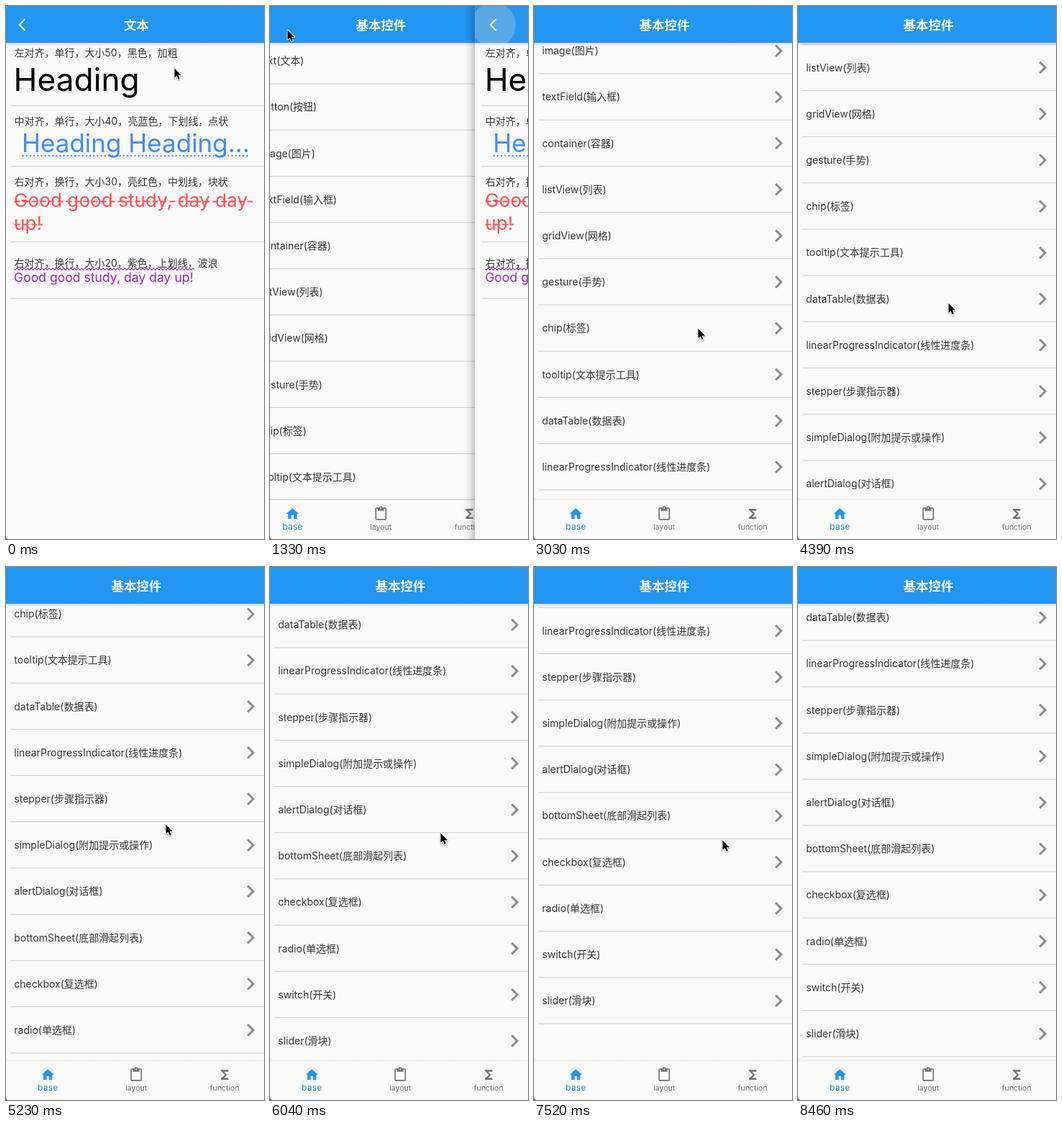
Write an HTML page with a canvas that moves like this. It is 359 by 740 pixels and loops after 8930 ms.

```html
<!DOCTYPE html>
<html lang="zh-CN">
<head>
<meta charset="utf-8">
<style>
html, body { margin: 0; width: 359px; height: 740px; overflow: hidden; background: #fafafa; }
canvas { display: block; }
</style>
</head>
<body>
<canvas id="stage" width="359" height="740"></canvas>
<script>
const ctx = document.getElementById('stage').getContext('2d');
const LOOP = 8930, LEFT = -3, WIDTH = 369, BAR = 51, NAV = 686, ROW = 64.2;
const MAX_SCROLL = 648, GLIDE = 50, LIFT = 130;
const FAMILY = 'Inter, "Noto Sans CJK SC", "Noto Sans CJK", sans-serif';
const INK = '#383838', BLUE = '#2196f3', PAPER = '#fafafa', GRAY = '#757575';

const rows = ['text(文本)', 'button(按钮)', 'image(图片)', 'textField(输入框)', 'container(容器)',
  'listView(列表)', 'gridView(网格)', 'gesture(手势)', 'chip(标签)', 'tooltip(文本提示工具)',
  'dataTable(数据表)', 'linearProgressIndicator(线性进度条)', 'stepper(步骤指示器)',
  'simpleDialog(附加提示或操作)', 'alertDialog(对话框)', 'bottomSheet(底部滑起列表)',
  'checkbox(复选框)', 'radio(单选框)', 'switch(开关)', 'slider(滑块)'];

const icons = {
  back: new Path2D('M11.67 3.87L9.9 2.1 0 12l9.9 9.9 1.77-1.77L3.54 12z'),
  next: new Path2D('M8.59 16.59L13.17 12 8.59 7.41 10 6l6 6-6 6z'),
  home: new Path2D('M10 20v-6h4v6h5v-8h3L12 3 2 12h3v8z'),
  clipboard: new Path2D('M19 2h-4.18C14.4.84 13.3 0 12 0c-1.3 0-2.4.84-2.82 2H5c-1.1 0-2 .9-2 2v16' +
    'c0 1.1.9 2 2 2h14c1.1 0 2-.9 2-2V4c0-1.1-.9-2-2-2zm-7 0c.55 0 1 .45 1 1s-.45 1-1 1-1-.45-1-1 ' +
    '.45-1 1-1zm7 18H5V4h2v3h10V4h2z'),
  sum: new Path2D('M18 4H6v2l6.5 6L6 18v2h12v-3h-7l5-5-5-5h7z'),
  cursor: new Path2D('M0 0V15.5L3.6 12.2 6 17.8 8.5 16.7 6.1 11.2H11z')
};

const easeOut = p => 1 - (1 - p) ** 3;
const smooth = p => p * p * (3 - 2 * p);
const clamp = p => Math.min(1, Math.max(0, p));
const progress = (t, from, to) => clamp((t - from) / (to - from));
const mix = (a, b, p) => a + (b - a) * p;

// Each swipe drags the list to `peak` in its first third, then glides on or springs back.
const swipes = [
  { start: 2020, end: 2910, peak: 92, x: 203, y: 380 },
  { start: 3030, end: 3910, peak: 261, x: 228, y: 448 },
  { start: 4390, end: 4850, peak: 405, x: 209, y: 413 },
  { start: 5060, end: 6040, peak: 588, x: 222, y: 425 },
  { start: 6340, end: 7140, peak: 694, x: 237, y: 369 },
  { start: 7260, end: 8040, peak: 694, x: 262, y: 509 }
];
const release = s => mix(s.start, s.end, 1 / 3);

function scrollAt(t) {
  return swipes.reduce((pos, s) => {
    const dragged = mix(pos, s.peak, progress(t, s.start, release(s)));
    const rest = Math.min(s.peak + GLIDE, MAX_SCROLL);
    return mix(dragged, rest, easeOut(progress(t, release(s), s.end)));
  }, 0);
}

// The pointer visits the back button, lifts with every swipe, then leaves at the bottom.
function cursorAt(t) {
  let x = 234, y = 86;
  const move = (from, to, toX, toY, ease = smooth) => {
    const p = ease(progress(t, from, to));
    x = mix(x, toX, p);
    y = mix(y, toY, p);
  };
  move(60, 580, 24, 33);
  move(1600, 1850, swipes[0].x, swipes[0].y);
  swipes.forEach((s, i) => {
    const next = swipes[i + 1] || { x: 294, y: 713 };
    move(s.start, release(s), s.x, s.y - LIFT, clamp);
    move(release(s), s.end, next.x, next.y);
  });
  move(8380, 8460, 312, 750);
  return [x, y];
}

// Page slide curve: cubic-bezier(.35, .91, .33, .97)
function slide(x) {
  const curve = (a, b, u) => 3 * (1 - u) ** 2 * u * a + 3 * (1 - u) * u * u * b + u ** 3;
  let lo = 0, hi = 1;
  for (let i = 0; i < 20; i++) {
    const mid = (lo + hi) / 2;
    if (curve(.35, .33, mid) < x) lo = mid; else hi = mid;
  }
  return curve(.91, .97, lo);
}

function text(str, x, y, size = 14, color = INK, align = 'left', weight = 400) {
  ctx.font = `${weight} ${size}px ${FAMILY}`;
  ctx.fillStyle = color;
  ctx.textAlign = align;
  ctx.fillText(str, x, y);
}

function icon(path, x, y, scale, color) {
  ctx.save();
  ctx.translate(x, y);
  ctx.scale(scale, scale);
  ctx.fillStyle = color;
  ctx.fill(path, 'evenodd');
  ctx.restore();
}

function rect(x, y, w, h, color) {
  ctx.fillStyle = color;
  ctx.fillRect(x, y, w, h);
}

function fade(x0, y0, x1, y1, stops) {
  const g = ctx.createLinearGradient(x0, y0, x1, y1);
  stops.forEach(([at, alpha]) => g.addColorStop(at, `rgba(0,0,0,${alpha})`));
  return g;
}

function divider(y) {
  rect(6, y, WIDTH - 9, 1, '#d0d0d0');
}

function dashes(x0, x1, y, color, width, pattern, cap = 'butt') {
  ctx.save();
  ctx.strokeStyle = color;
  ctx.lineWidth = width;
  ctx.lineCap = cap;
  ctx.setLineDash(pattern);
  ctx.beginPath();
  ctx.moveTo(x0, y);
  ctx.lineTo(x1, y);
  ctx.stroke();
  ctx.restore();
}

function wave(x0, x1, y, color) {
  ctx.strokeStyle = color;
  ctx.lineWidth = 1.1;
  ctx.beginPath();
  for (let x = x0; x <= x1; x += .5) ctx.lineTo(x, y + 1.2 * Math.sin((x - x0) * Math.PI / 2.5));
  ctx.stroke();
}

function appBar(title) {
  rect(LEFT, BAR, WIDTH, 5, fade(0, BAR, 0, BAR + 5, [[0, .2], [.4, .08], [1, 0]]));
  rect(LEFT, 0, WIDTH, BAR, BLUE);
  text(title, 181.5, 32.6, 17.5, '#fff', 'center', 600);
}

function listPage(scroll) {
  rect(LEFT, 0, WIDTH, 740, PAPER);
  rows.forEach((label, i) => {
    const y = 76.2 + i * ROW - scroll;
    text(label, 11.3, y + 5);
    icon(icons.next, 322.7, y - 17.5, 1.46, '#8a8a8a');
    divider(y + 31.3);
  });
  appBar('基本控件');
  rect(LEFT, NAV - 3, WIDTH, 3, fade(0, NAV - 3, 0, NAV, [[0, 0], [1, .07]]));
  rect(LEFT, NAV, WIDTH, 740 - NAV, PAPER);
  [['base', icons.home], ['layout', icons.clipboard], ['function', icons.sum]].forEach(([label, path], i) => {
    const x = 58.2 + i * WIDTH / 3, size = i ? 10.5 : 12.3, color = i ? GRAY : BLUE;
    icon(path, x - 10.5, 694.5, .877, color);
    text(label, x, 726.8, size, color, 'center');
  });
}

function textPage(press) {
  const blue = '#448aff', red = '#ff5252', purple = '#9c27b0';
  rect(LEFT, 0, WIDTH, 740, PAPER);
  text('左对齐，单行，大小50，黑色，加粗', 11.5, 70);
  text('Heading', 10.5, 117.5, 44.3, '#000');
  text('中对齐，单行，大小40，亮蓝色，下划线，点状', 11.5, 164.5);
  text('Heading Heading…', 22, 202.7, 35, blue);
  dashes(23.5, 338, 208, blue, 2.3, [0, 5.2], 'round');
  text('右对齐，换行，大小30，亮红色，中划线，块状', 11.5, 248.5);
  text('Good good study, day day', 11, 279, 26.2, red);
  dashes(11.5, 348, 271.5, red, 1.8, [8, 4]);
  text('up!', 11, 311, 26.2, red);
  dashes(11.5, 51, 303.5, red, 1.8, [8, 4]);
  text('右对齐，换行，大小20，紫色，上划线，波浪', 11.5, 361.5);
  text('Good good study, day day up!', 11, 383, 17.6, purple);
  wave(11.5, 262, 365.3, purple);
  [138, 222, 327, 405.5].forEach(divider);
  appBar('文本');
  ctx.save();
  ctx.beginPath();
  ctx.rect(LEFT, 0, WIDTH, BAR);
  ctx.clip();
  ctx.fillStyle = `rgba(204,204,204,${.33 * press})`;
  ctx.beginPath();
  ctx.arc(23, 26, 14 + 17 * press, 0, 7);
  ctx.fill();
  ctx.restore();
  icon(icons.back, 17, 15.5, .877, '#fff');
}

function shifted(x, paint) {
  ctx.save();
  ctx.translate(x, 0);
  paint();
  ctx.restore();
}

function pointer(x, y) {
  ctx.save();
  ctx.translate(x + .5, y + .5);
  ctx.scale(.86, .86);
  ctx.lineJoin = 'round';
  ctx.strokeStyle = '#fff';
  ctx.lineWidth = 2;
  ctx.shadowColor = 'rgba(0,0,0,.4)';
  ctx.shadowBlur = 2;
  ctx.shadowOffsetY = 1;
  ctx.stroke(icons.cursor);
  ctx.shadowColor = 'transparent';
  ctx.fillStyle = '#000';
  ctx.fill(icons.cursor);
  ctx.restore();
}

function draw(t) {
  const out = slide(progress(t, 1195, 1595));
  shifted(-WIDTH / 3 * (1 - out), () => listPage(scrollAt(t)));
  if (t < 1595) {
    shifted(WIDTH * out, () => {
      const edge = fade(LEFT - 18, 0, LEFT, 0, [[0, 0], [.3, .016], [.6, .07], [1, .22]]);
      rect(LEFT - 18, 0, 18, 740, edge);
      textPage(easeOut(progress(t, 930, 1230)));
    });
  }
  // Rounded window corner
  ctx.fillStyle = '#666';
  ctx.beginPath();
  ctx.moveTo(0, 737);
  ctx.quadraticCurveTo(.6, 739.4, 3, 740);
  ctx.lineTo(0, 740);
  ctx.fill();
  pointer(...cursorAt(t));
}

const start = performance.now();
function tick() {
  draw((performance.now() - start) % LOOP);
  requestAnimationFrame(tick);
}
tick();
</script>
</body>
</html>
```
